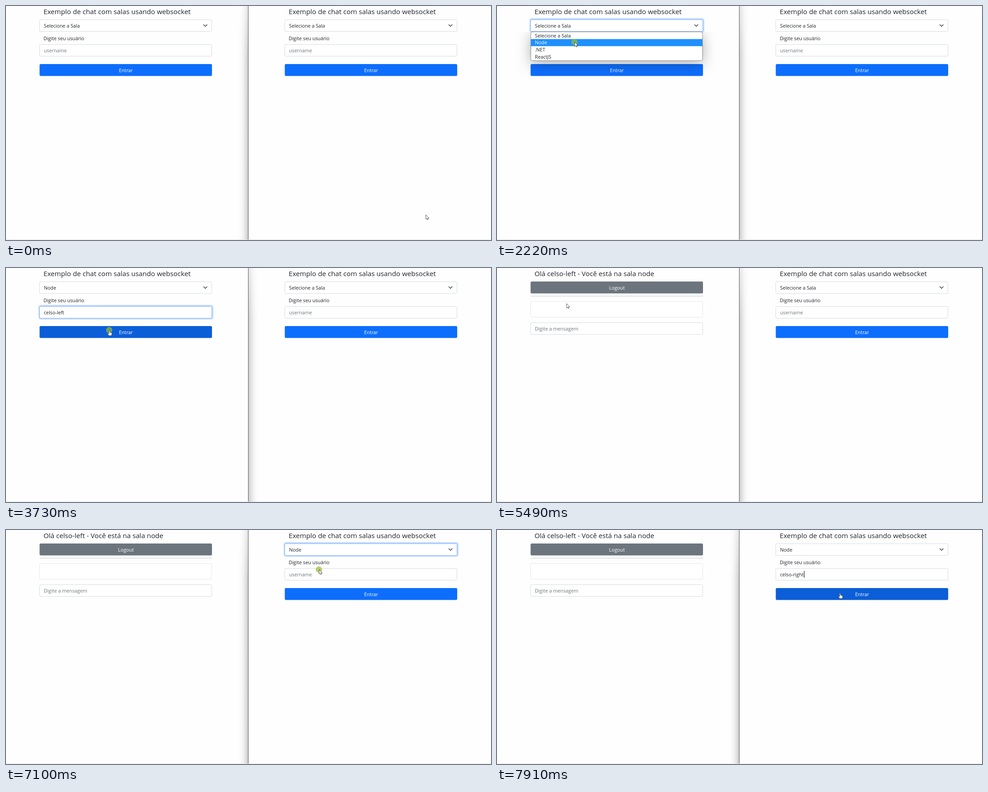
Animation of 1076 by 520 pixels, one loop 8 s. Source, as an HTML page with a canvas:

```html
<!DOCTYPE html>
<html lang="pt-BR">
<head>
<meta charset="utf-8">
<title>Chat com salas</title>
<style>
html, body { margin: 0; width: 100%; height: 100%; overflow: hidden; background: #fefefe; }
canvas { display: block; }
</style>
</head>
<body>
<canvas id="stage" width="1076" height="520"></canvas>
<script>
const ctx = document.getElementById('stage').getContext('2d');
const LOOP = 8000, KEY_MS = 30, PRESS_MS = 90, CHAT_AT = 4000;
const FAMILY = '"Open Sans", "Noto Sans", sans-serif';
const INK = '#212529', MUTED = '#6c757d', BORDER = '#d6dbe0';
const ROOMS = ['Selecione a Sala', 'Node', '.NET', 'ReactJS'];
const ROW = 15.9;

// When each user opens the list, picks a room, enters the field, types and submits
const LEFT = { x: 0, user: 'celso-left', open: 1360, pick: 2200, focus: 2510, type: 3050, submit: 3720 };
const RIGHT = { x: 544, user: 'celso-right', open: 6380, pick: 7030, focus: 7150, type: 7250, submit: Infinity };

// Pointer moves: start, duration, end x, end y, sag
const MOVES = [
  [30, 530, 206, 45],
  [1770, 270, 172, 80],
  [2300, 180, 180, 99],
  [2620, 240, 184, 124],
  [3370, 140, 229, 138],
  [3950, 110, 154, 79],
  [5490, 780, 662, 52, 50],
  [6620, 200, 690, 80],
  [7070, 70, 700, 99],
  [7180, 60, 703, 126],
  [7620, 290, 761, 140]
];

const ramp = (t, a, b) => Math.min(1, Math.max(0, (t - a) / (b - a)));
const within = (t, a, b) => t >= a && t < b;
// Rises over d after a, falls over d after b
const pulse = (t, a, b, d) => ramp(t, a, a + d) * (1 - ramp(t, b, b + d));
const mix = (p, q, k) => `rgb(${p.map((v, i) => Math.round(v + (q[i] - v) * k))})`;

function text(str, x, y, color = INK, size = 10.75, align = 'left', weight = 400) {
  ctx.font = `${weight} ${size}px ${FAMILY}`;
  ctx.textAlign = align;
  ctx.fillStyle = color;
  ctx.fillText(str, x, y);
}

function box(x, y, w, h, r, fill, stroke, line = 1) {
  ctx.beginPath();
  ctx.roundRect(x, y, w, h, r);
  ctx.lineWidth = line;
  if (fill) { ctx.fillStyle = fill; ctx.fill(); }
  if (stroke) { ctx.strokeStyle = stroke; ctx.stroke(); }
}

function ring(x, y, k, alpha) {
  if (k) box(x + 73.5, y - 1.5, 385, 29.5, 4, null, `rgba(13,110,253,${alpha * k})`, 3);
}

function field(x, y, h, focus = 0, border = BORDER) {
  ring(x, y, focus, 0.25);
  const edge = focus ? mix([214, 219, 224], [134, 183, 254], focus) : border;
  box(x + 74.5, y + 0.5, 382, h, 2.5, '#fff', edge);
}

function button(x, y, label, color, focus = 0) {
  ring(x, y, focus, 0.5);
  box(x + 74.5, y, 382.5, 26.5, 2.7, color);
  text(label, x + 266, y + 17.5, '#fff', 10.75, 'center', 500);
}

function title(x, str) {
  text(str, x + 83.2, 18.2, INK, 15.2);
}

function chevron(x) {
  ctx.beginPath();
  ctx.moveTo(x + 438.4, 41.5);
  ctx.lineTo(x + 442.2, 45.3);
  ctx.lineTo(x + 446, 41.5);
  ctx.strokeStyle = '#343a40';
  ctx.lineWidth = 1.4;
  ctx.lineCap = ctx.lineJoin = 'round';
  ctx.stroke();
}

function dropdown(x, t, s) {
  const open = pulse(t, s.open + 20, s.pick + 30, 40);
  if (!open) return;
  const shape = [x + 75, 57.5, 381, 64, 3.5];
  // Shadow only outside the list, so the page shows through while it fades in
  ctx.save();
  ctx.beginPath();
  ctx.rect(x + 20, 57, 500, 140);
  ctx.roundRect(...shape);
  ctx.clip('evenodd');
  ctx.shadowColor = `rgba(0,0,0,${0.3 * open})`;
  ctx.shadowBlur = 30;
  ctx.shadowOffsetY = 7;
  box(...shape, '#fff');
  ctx.restore();

  const hot = t < s.pick - 250 ? 0 : 1;
  ctx.save();
  ctx.globalAlpha = pulse(t, s.open + 60, s.pick + 30, 80);
  box(...shape, '#fff');
  box(x + 75, 57.5 + ROW * hot, 381, ROW, 0, '#1e90ff');
  ROOMS.forEach((name, i) => text(name, x + 84, 69.5 + ROW * i, i === hot ? '#fff' : INK));
  ctx.globalAlpha = open;
  box(...shape, null, '#8b8b8b');
  ctx.restore();
}

function suggestion(x, k) {
  if (!k) return;
  ctx.save();
  ctx.globalAlpha = k;
  ctx.shadowColor = 'rgba(0,0,0,.3)';
  ctx.shadowBlur = 4;
  ctx.shadowOffsetY = 1;
  box(x + 74, 112.5, 136, 36.5, 2.5, '#292a2d');
  ctx.shadowColor = 'transparent';
  text(LEFT.user, x + 82.5, 134, '#f1f3f4', 8.6, 'left', 700);
  ctx.restore();
}

const typingEnd = s => s.type + s.user.length * KEY_MS + 20;
const hover = (t, s) => ramp(t, typingEnd(s) + 80, typingEnd(s) + 150);

function loginPage(t, s) {
  const { x } = s, end = typingEnd(s);
  const typed = s.user.slice(0, Math.max(0, 1 + Math.floor((t - s.type) / KEY_MS)));

  title(x, 'Exemplo de chat com salas usando websocket');
  field(x, 30, 26, pulse(t, s.open + 60, s.focus, 100));
  text(ROOMS[t < s.pick + 30 ? 0 : 1], x + 84, 47.5);
  chevron(x);
  text('Digite seu usuário', x + 83.3, 75.5);
  field(x, 85, 26, pulse(t, s.focus, s.submit + 20, 70));
  text(typed || 'username', x + 84, 103, typed ? INK : MUTED);
  if (within(t, s.focus, Math.min(s.submit, s.type + 460)) || s.submit === Infinity && t > s.focus) {
    const w = typed ? ctx.measureText(typed).width : 0;
    box(Math.round(x + 84.3 + w), 91, 1, 15, 0, '#000');
  }
  button(x, 129, 'Entrar', mix([13, 110, 253], [11, 94, 215], hover(t, s)),
    ramp(t, s.submit + 20, s.submit + 90) || 0);
  suggestion(x, pulse(t, s.focus + 70, end, 30));
  dropdown(x, t, s);
}

function chatPage() {
  title(0, `Olá ${LEFT.user} - Você está na sala node`);
  button(0, 30, 'Logout', MUTED);
  box(75, 62, 382, 1, 0, '#c8c9ca');
  field(0, 74, 35, 0, '#e6e7e8');
  field(0, 121, 26);
  text('Digite a mensagem', 84, 139, MUTED);
}

function divider(leftActive) {
  const side = leftActive ? 1 : -1;
  for (let d = 0; d < 26; d++) {
    const alpha = 0.2 * (1 - d / 26) ** 2.6;
    const shade = ctx.createLinearGradient(0, 0, 0, 110);
    shade.addColorStop(0, `rgba(0,0,0,${alpha * 0.5})`);
    shade.addColorStop(1, `rgba(0,0,0,${alpha})`);
    ctx.fillStyle = shade;
    ctx.fillRect(537 + side * (d + 1), 0, 1, 520);
  }
  box(537, 0, 1, 520, 0, '#5c5c5c');
  box(0, 519, 1076, 1, 0, '#e2e2e2');
}

function pointerAt(t) {
  let x = 931, y = 464;
  for (const [from, span, toX, toY, sag = 0] of MOVES) {
    const u = ramp(t, from, from + span), k = u * u * (3 - 2 * u);
    x += (toX - x) * k;
    y += (toY - y) * k + sag * Math.sin(Math.PI * k);
  }
  return [x, y];
}

const ARROW = new Path2D('M.5 .5V10L2.7 8 4.3 11.4 5.8 10.7 4.3 7.5H7.2Z');
const HAND = new Path2D('M-1 1Q0-.6 1 1V5Q2.2 4.3 2.9 5.4 4 4.8 4.6 5.9 5.8 5.6 5.9 7' +
  'V9.3L4.8 12.3H-.6L-3.9 8Q-3.8 6.6-2.5 7.2L-1 8.3Z');
const BEAM = new Path2D('M-2-5.5Q0-5.5 0-4.5 0-5.5 2-5.5M0-4.5V4.5M-2 5.5Q0 5.5 0 4.5 0 5.5 2 5.5');

function pointer(t) {
  const [x, y] = pointerAt(t);
  const s = t < CHAT_AT ? LEFT : RIGHT;
  const pressed = [s.open, s.pick, s.focus, s.submit].some(at => within(t, at, at + PRESS_MS));
  const shape = within(t, s.focus - 40, s.focus + 60) ? BEAM : hover(t, s) ? HAND : ARROW;
  ctx.save();
  ctx.translate(x, y);
  if (pressed) box(-7, -7, 14, 14, 7, 'rgba(150,190,50,.7)');
  ctx.lineWidth = 0.8;
  ctx.strokeStyle = '#333';
  ctx.fillStyle = '#fff';
  if (shape !== BEAM) ctx.fill(shape);
  ctx.stroke(shape);
  ctx.restore();
}

function draw(t) {
  box(0, 0, 1076, 520, 0, '#fefefe');
  divider(within(t, LEFT.open + 30, RIGHT.open + 30));
  if (t < CHAT_AT) loginPage(t, LEFT);
  else chatPage();
  loginPage(t, RIGHT);
  pointer(t);
}

const start = performance.now();
function tick() {
  draw((performance.now() - start) % LOOP);
  requestAnimationFrame(tick);
}
tick();
</script>
</body>
</html>
```
